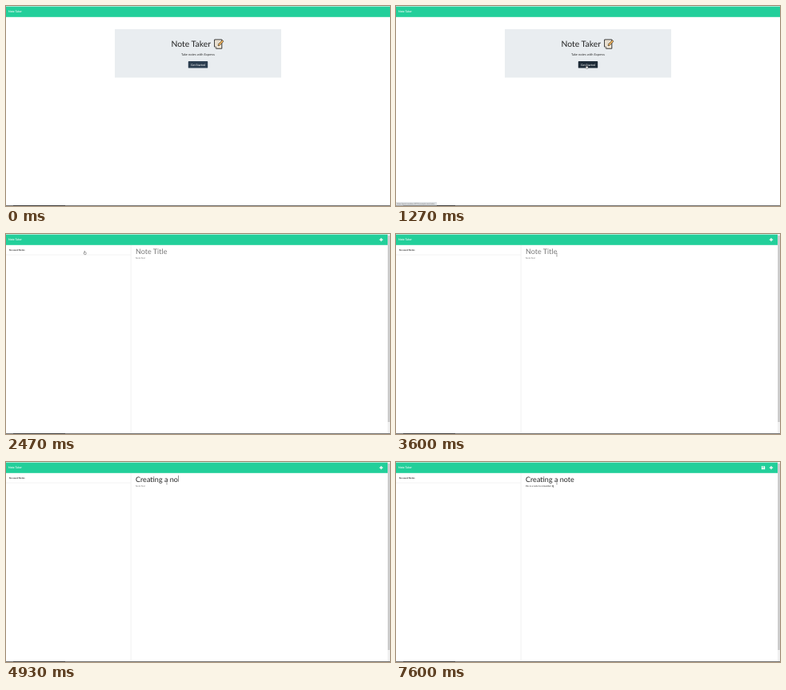
An HTML page for the animation above (8000 ms loop, 480x250 px).

```html
<!DOCTYPE html>
<html lang="en">
<head>
<meta charset="utf-8">
<title>Note Taker</title>
<style>
  html, body { margin: 0; width: 100%; height: 100%; overflow: hidden; background: #fff; }
  svg { display: block; width: 480px; height: 250px; }
  text { font-family: Lato, "Open Sans", sans-serif; text-rendering: geometricPrecision; white-space: pre; }
  .mid { text-anchor: middle; }
</style>
</head>
<body>
<svg viewBox="0 0 480 250">
  <defs>
    <g id="arrow"><path d="M0 0V3.6L.9 2.9 1.5 4.1 2 3.8 1.5 2.7H2.6Z" fill="#fff" stroke="#222" stroke-width=".35"/></g>
    <g id="hand"><path d="M-.6-1.9Q-.2-2.3.1-1.9V-.5L1.6-.2Q1.9 0 1.8.5L1.4 2.2H-.6L-1.6.5Q-1.5 0-.6.6Z" fill="#fff" stroke="#333" stroke-width=".4"/></g>
    <g id="beam"><path d="M-.7-1.8H.7M0-1.8V1.8M-.7 1.8H.7" fill="none" stroke="#666" stroke-width=".5"/></g>
  </defs>

  <rect width="480" height="250" fill="#fff"/>
  <rect y=".6" width="480" height="13.2" fill="#22cf9a"/>
  <text x="3" y="8.3" font-size="3.5" font-weight="600" fill="#fff">Note Taker</text>

  <g id="landing">
    <rect x="136" y="29" width="208" height="60.5" fill="#e9edf0"/>
    <text x="206.5" y="51.2" font-size="10.4" fill="#222">Note Taker</text>
    <g stroke-linejoin="round">
      <path d="M260.6 42H269.8V53.2H262.8L260.6 51Z" fill="#f6ecdc" stroke="#222" stroke-width=".9"/>
      <path d="M260.6 51H262.8V53.2" fill="#fff" stroke="#222" stroke-width=".6"/>
      <path d="M262.6 44.6H267M262.6 46.6H266M262.6 48.6H264.6" stroke="#b9ae9e" stroke-width=".5"/>
      <path d="M265 49.8L265.6 47.6 270.4 42.6 272 44.2 267.2 49.2Z" fill="#efb35c" stroke="#222" stroke-width=".6"/>
    </g>
    <text class="mid" x="240" y="61.8" font-size="4" fill="#333">Take notes with Express</text>
    <rect id="button" x="227.8" y="69" width="24.4" height="8.6" rx=".7"/>
    <text class="mid" x="240" y="74.5" font-size="3.6" fill="#fff">Get Started</text>
  </g>

  <g id="notes">
    <path d="M156.2 14V249" stroke="#e9e9e9" stroke-width=".6"/>
    <g id="list">
      <path d="M0 26.1H156" stroke="#e6e6e6" stroke-width=".5"/>
      <text x="3.8" y="20.8" font-size="2.81" font-weight="700" fill="#333">No saved Notes</text>
    </g>
    <text id="title" x="162" y="24.6" font-size="9.04"></text>
    <text id="body" x="162" y="31.4" font-size="2.81"></text>
    <rect id="caret" width=".5" fill="#222"/>
    <path d="M469 4.9V9.3M466.8 7.1H471.2" stroke="#fff" stroke-width="1.2"/>
    <g id="save">
      <path d="M456.9 5H460.4L461.2 5.8V9.3H456.9Z" fill="#fff"/>
      <path d="M457.6 5.6H460V6.7H457.6Z" fill="#22cf9a"/>
      <circle cx="459" cy="8" r=".6" fill="#22cf9a"/>
    </g>
    <rect x="477" width="3" height="250" fill="#f0f0f0"/>
    <rect x="477.4" y="2" width="2.3" height="233" fill="#c6c6c6"/>
  </g>

  <rect y="249" width="480" height="1" fill="#777"/>
  <rect x="9" y="249" width="65" height="1" fill="#444"/>
  <g id="status">
    <rect y="245" width="51" height="4.4" fill="#dee1e4"/>
    <text x="1" y="247.9" font-size="2.2" fill="#666">https://quiet-meadow-40718.example.com/notes</text>
  </g>
  <use id="cursor"/>
</svg>
<script>
const LOOP = 8000, OPEN = 1330, TYPE = 3930, TAB = 5200, WRITE = 5400;
const TITLE = "Creating a note", BODY = "this is a note to remember it";
const $ = id => document.getElementById(id);
const show = (id, on) => $(id).setAttribute("visibility", on ? "inherit" : "hidden");

// [time, x, y]
const path = [
  [70, 476, 95], [800, 238.3, 76], [1270, 238.3, 76], [1330, 235, 75],
  [1870, 94, 23], [2200, 94, 23], [2270, 94.4, 23.4], [2400, 94.4, 23.4],
  [2470, 98.5, 23.4], [3270, 201, 25.4], [3330, 201, 26]
];

// [start, end, characters before, characters after, steps]
const titleRuns = [[3930, 3930, 0, 1, 1], [4070, 4800, 1, 11, 10], [4930, 4930, 11, 13, 1], [5000, 5130, 13, 15, 2]];
const bodyRuns = [[5400, 6000, 0, 9, 7], [6200, 6330, 9, 12, 2], [6470, 6730, 12, 17, 4], [6870, 7600, 17, 29, 9]];

function typed(runs, t) {
  let n = 0;
  for (const [start, end, from, to, steps] of runs) {
    if (t < start) break;
    const gap = (end - start) / (steps - 1 || 1) || 1;
    const k = Math.min(steps, Math.floor((t - start) / gap + 1.001));
    n = Math.round(from + (to - from) * k / steps);
  }
  return n;
}

function pointer(t) {
  const i = path.findIndex(p => p[0] > t);
  if (i < 0) return path[path.length - 1].slice(1);
  if (i === 0) return path[0].slice(1);
  const [t0, x0, y0] = path[i - 1], [t1, x1, y1] = path[i];
  const u = (t - t0) / (t1 - t0), e = u * u * (3 - 2 * u);
  return [x0 + (x1 - x0) * e, y0 + (y1 - y0) * e];
}

function field(id, text, hint) {
  const el = $(id), value = text || hint;
  if (el.textContent !== value) el.textContent = value;
  el.setAttribute("fill", text ? "#222" : "#777");
  return text ? el.getComputedTextLength() : 0;
}

function placeCaret(x, y, h) {
  const c = $("caret");
  c.setAttribute("x", x);
  c.setAttribute("y", y);
  c.setAttribute("height", h);
}

function render(t) {
  const open = t >= OPEN, [x, y] = pointer(t);
  const hover = !open && x > 227 && x < 253 && y > 69 && y < 78;

  show("landing", !open);
  show("notes", open);
  show("list", open && t >= 1400);
  show("save", t >= WRITE);
  show("status", hover || (open && t < 1600));
  $("button").setAttribute("fill", hover ? "#1e2b37" : "#2c3e50");

  const titleW = field("title", TITLE.slice(0, typed(titleRuns, t)), "Note Title");
  const bodyW = field("body", BODY.slice(0, typed(bodyRuns, t)), "Note Text");
  show("caret", (t >= 3070 && t < 3600) || t >= TYPE);
  if (t < TAB) placeCaret(162 + titleW + .2, 16.8, 8);
  else placeCaret(162 + bodyW, 28.9, 3);

  let shape = "arrow";
  if (hover || (open && x < 157 && y < 26)) shape = "hand";
  else if (open && x >= 157) shape = "beam";
  const c = $("cursor");
  show("cursor", t >= 70);
  c.setAttribute("href", "#" + shape);
  c.setAttribute("transform", `translate(${x} ${y})`);
}

const begin = performance.now();
function tick() {
  render((performance.now() - begin) % LOOP);
  requestAnimationFrame(tick);
}
tick();
</script>
</body>
</html>
```
